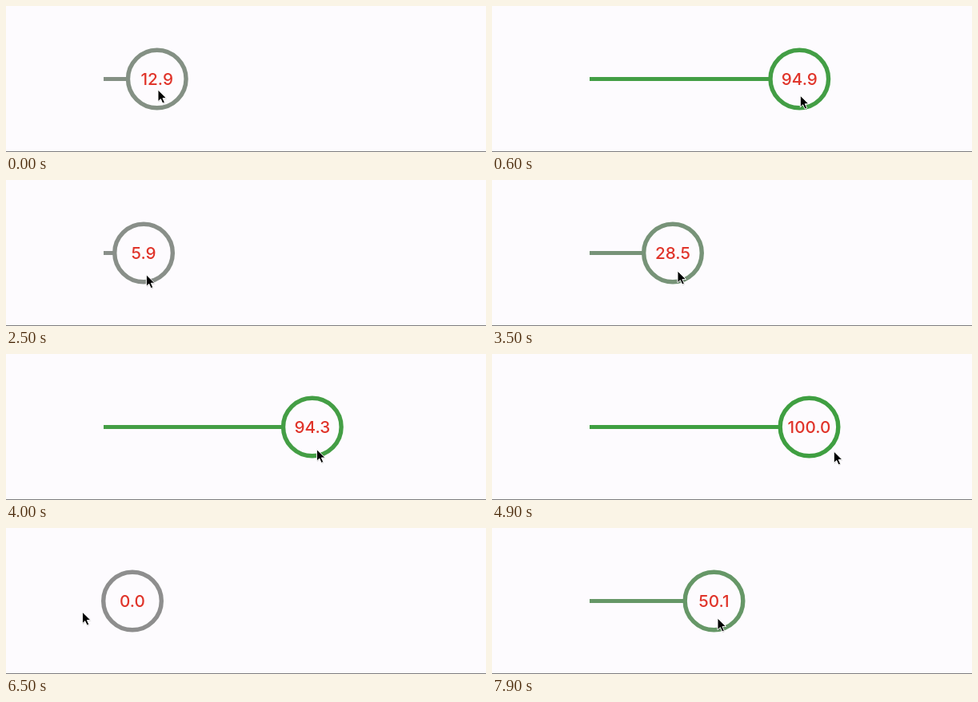
Write an HTML page that moves like this. It is 600 by 183 pixels and loops after 8 s.

```html
<!DOCTYPE html>
<html lang="en">
<head>
<meta charset="utf-8">
<title>Drag slider</title>
<style>
  html, body { margin: 0; width: 100%; height: 100%; overflow: hidden; background: #fdfbfe; }
  svg { display: block; width: 600px; height: 183px; }
  text { font: 500 20.7px Inter, Roboto, sans-serif; text-anchor: middle; fill: #e0342a; }
</style>
</head>
<body>
<svg viewBox="0 0 600 183">
  <defs><path id="arrow" d="M0 0V15.2L3.5 12L6 17.6L8.7 16.4L6.2 10.9H11Z"/></defs>
  <rect width="600" height="183" fill="#fdfbfe"/>
  <rect y="182" width="600" height="1" fill="#7d7c7e"/>
  <rect id="track" x="122" y="89" height="5"/>
  <circle id="ring" cy="91.5" r="36.3" fill="#fdfbfe" stroke-width="5.4"/>
  <text id="label" y="98.6"></text>
  <g id="pointer">
    <use href="#arrow" x=".6" y="1.2" opacity=".15"/>
    <use href="#arrow" stroke="#fff" stroke-linejoin="round"/>
  </g>
</svg>
<script>
const LOOP = 8000, STEP = 100;
const START = 158, SPAN = 238.5;
const GREY = [142, 142, 142], GREEN = [63, 159, 65];

// Turning points of the drag: time, pointer x, pointer y, grip offset from the knob centre
const drag = [
  [0, 190, 106, 1.23],
  [1100, 477, 117, 1],
  [1800, 428, 118, 1],
  [2800, 115, 120, 4],
  [3100, 115, 120, 4],
  [3500, 232, 115, 6.03],
  [4300, 433, 123, 5],
  [4800, 433, 123, 0],
  [5500, 275, 118, -2.97],
  [6100, 105, 107, 0],
  [6600, 95, 106, 0],
  [7500, 178, 112, 4],
  [7900, 282, 114, 4.51]
];

const el = id => document.getElementById(id);
const track = el("track"), ring = el("ring"), label = el("label"), pointer = el("pointer");

function slope(i, c) {
  const j = Math.max(0, Math.min(drag.length - 2, i));
  return (drag[j + 1][c] - drag[j][c]) / (drag[j + 1][0] - drag[j][0]);
}

function tangent(i, c) {
  const p = slope(i - 1, c), q = slope(i, c);
  return p * q > 0 ? 2 * p * q / (p + q) : 0;
}

// Smooth curve through the turning points that never overshoots
function sample(t, c) {
  let i = 0;
  while (i < drag.length - 2 && t >= drag[i + 1][0]) i++;
  const a = drag[i], b = drag[i + 1], d = b[0] - a[0];
  const u = (t - a[0]) / d, w = 1 - u;
  return a[c] * w * w * (1 + 2 * u) + b[c] * u * u * (3 - 2 * u)
    + d * u * w * (tangent(i, c) * w - tangent(i + 1, c) * u);
}

function draw(t) {
  const x = sample(t, 1), y = sample(t, 2);
  const f = Math.max(0, Math.min(1, (x - sample(t, 3) - START) / SPAN));
  const cx = START + SPAN * f;
  const color = `rgb(${GREY.map((g, i) => Math.round(g + (GREEN[i] - g) * f))})`;
  track.setAttribute("width", cx - 122);
  track.setAttribute("fill", color);
  ring.setAttribute("cx", cx);
  ring.setAttribute("stroke", color);
  label.setAttribute("x", cx);
  label.textContent = (f * 100).toFixed(1);
  pointer.setAttribute("transform", `translate(${x} ${y - 0.9}) scale(.96)`);
}

const began = performance.now();
function tick() {
  const t = (performance.now() - began) % LOOP;
  draw(Math.floor(t / STEP) * STEP);
  requestAnimationFrame(tick);
}
tick();
</script>
</body>
</html>
```
